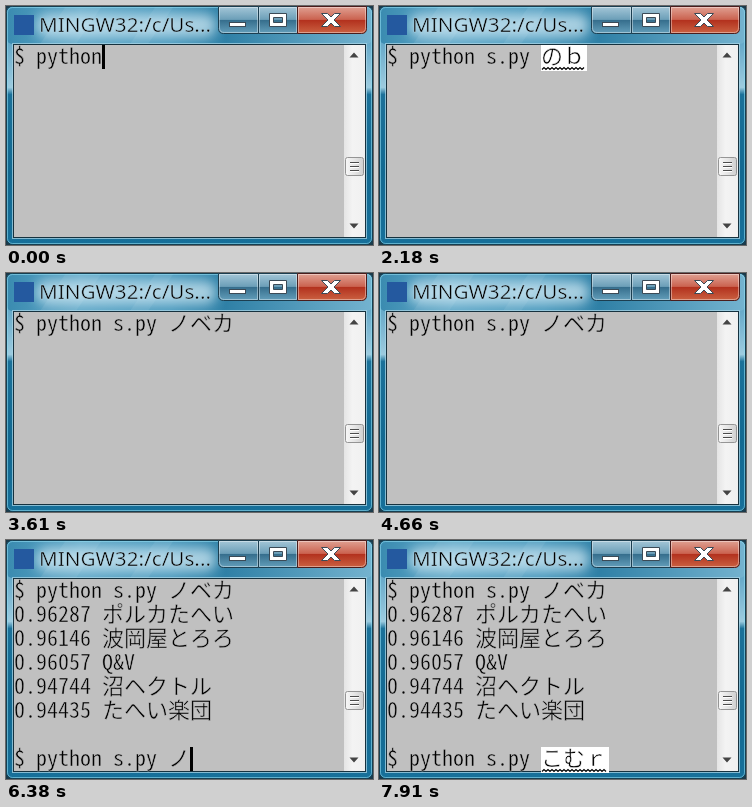
An HTML page that plays this animation: 367x239 px, repeating every 8000 ms.

```html
<!DOCTYPE html>
<html lang="ja">
<head>
<meta charset="utf-8">
<title>Terminal</title>
<style>
  html, body { margin: 0; width: 100%; height: 100%; overflow: hidden; background: #1b3a4a; }
  svg { display: block; width: 367px; height: 239px; }
  /* a stroke in the background colour thins the letters */
  text { white-space: pre; font-kerning: none; stroke-width: .5; }
  .title { font: 20.7px "Noto Sans", "Open Sans", sans-serif; stroke: #b4d6e5; }
  .term { font: 22px "Noto Sans Mono CJK JP", "Noto Sans CJK JP", "Noto Sans CJK SC", monospace; }
  .half { font-feature-settings: "hwid"; }
</style>
</head>
<body>
<svg viewBox="0 0 367 239">
  <defs>
    <linearGradient id="side" x2="0" y2="1">
      <stop offset="0" stop-color="#4f9cc0"/>
      <stop offset=".16" stop-color="#68aac9"/>
      <stop offset=".34" stop-color="#9ccbdf"/>
      <stop offset=".37" stop-color="#1b7199"/>
      <stop offset=".7" stop-color="#126991"/>
      <stop offset="1" stop-color="#17709a"/>
    </linearGradient>
    <linearGradient id="bar">
      <stop offset="0" stop-color="#3a8bb0"/>
      <stop offset=".2" stop-color="#61a8c8"/>
      <stop offset=".45" stop-color="#4b99bd"/>
      <stop offset=".6" stop-color="#2f80a6"/>
      <stop offset="1" stop-color="#74b3cf"/>
    </linearGradient>
    <linearGradient id="steel" x2="0" y2="1">
      <stop offset="0" stop-color="#a5c7d8"/>
      <stop offset=".48" stop-color="#6c9fb8"/>
      <stop offset=".5" stop-color="#356d8c"/>
      <stop offset="1" stop-color="#649fbb"/>
    </linearGradient>
    <linearGradient id="red" x2="0" y2="1">
      <stop offset="0" stop-color="#e0a294"/>
      <stop offset=".48" stop-color="#cb6350"/>
      <stop offset=".5" stop-color="#b2301d"/>
      <stop offset="1" stop-color="#cb6242"/>
    </linearGradient>
    <linearGradient id="track">
      <stop offset="0" stop-color="#e4e4e4"/>
      <stop offset=".4" stop-color="#f3f3f3"/>
      <stop offset="1" stop-color="#f0f0f0"/>
    </linearGradient>
    <linearGradient id="thumb">
      <stop offset="0" stop-color="#f7f7f7"/>
      <stop offset=".5" stop-color="#e6e6e6"/>
      <stop offset="1" stop-color="#cfcfcf"/>
    </linearGradient>
    <filter id="blur" x="-20%" y="-60%" width="140%" height="220%"><feGaussianBlur stdDeviation="6"/></filter>
    <clipPath id="top"><rect x="1" y="1" width="365" height="37"/></clipPath>
  </defs>

  <!-- glass frame -->
  <rect x=".5" y=".5" width="366" height="238" rx="6" fill="url(#side)" stroke="#153f52"/>
  <g clip-path="url(#top)">
    <rect x="1" y="1" width="365" height="37" rx="5" fill="url(#bar)"/>
    <path d="M60 0h36L70 38H34zM150 0h18l-26 38h-18z" fill="#fff" opacity=".07"/>
    <rect x="30" y="8" width="180" height="23" rx="10" fill="#dcf0f8" opacity=".68" filter="url(#blur)"/>
  </g>
  <rect x="1.500" y="1.500" width="364" height="236" rx="5" fill="none" stroke="#8fdcf2" stroke-opacity=".6"/>
  <rect x="8" y="9" width="20" height="20" fill="#24599f"/>
  <text class="title" x="33" y="25.500">MINGW32:/c/Us...</text>

  <!-- caption buttons -->
  <g stroke="#1c3e50">
    <path d="M212.500 .5h40v27h-35q-5 0-5-5z" fill="url(#steel)"/>
    <path d="M252.500 .5h39v27h-39z" fill="url(#steel)"/>
    <path d="M291.500 .5h69v22q0 5-5 5h-64z" fill="url(#red)" stroke="#4a1d1c"/>
  </g>
  <path d="M213.500 22V1.500h38v25h-33q-5 0-5-4.500M253.500 1.500h37v25h-37zM292.500 1.500h67V22q0 4.500-5 4.500h-62z" fill="none" stroke="#fff" stroke-opacity=".4"/>
  <g fill="#fff" stroke="#3b4a56">
    <rect x="223.500" y="16.500" width="16" height="4"/>
    <path fill-rule="evenodd" d="M263.500 7.500h17v13h-17zM267.500 11.500h9v5h-9z"/>
    <path d="M315.500 7.500h6L325 11l3.500-3.500h6l-6.500 6.500 6.500 6.500h-6L325 17l-3.500 3.500h-6L322 14z"/>
  </g>

  <!-- client area and scrollbar -->
  <rect x="6.500" y="37.500" width="354" height="195" fill="none" stroke="#a9d5e6" stroke-opacity=".75"/>
  <rect x="7.500" y="38.500" width="352" height="193" fill="#c0c0c0" stroke="#16323f"/>
  <rect x="338" y="39" width="21" height="192" fill="url(#track)"/>
  <path d="M343.500 51.500l4.500-5 4.500 5zM343.500 217.500l4.500 5 4.500-5z" fill="#444"/>
  <rect x="339.500" y="151.500" width="18" height="18" rx="2" fill="url(#thumb)" stroke="#959595"/>
  <path d="M344 157.500h9M344 161.500h9M344 165.500h9" stroke="#fff"/>
  <path d="M344 156.500h9M344 160.500h9M344 164.500h9" stroke="#4c4c4c"/>

  <g id="screen"></g>
</svg>

<script>
const LOOP = 8000, LEFT = 8, TOP = 39, CELL = 11, LINE = 24;
const GRAY = '#c0c0c0', WHITE = '#fff';
const NAME = 'ノベカ';
const CMD = '$ python s.py ';
const OUTPUT = [
  '0.96287 ポルカたへい',
  '0.96146 波岡屋とろろ',
  '0.96057 Q&V',
  '0.94744 沼ヘクトル',
  '0.94435 たへい楽団',
];

// [time, row, text on that row, caret shown, text being composed]
const steps = [
  [0, 0, '$ python', 1],
  [120, 0, '$ python ', 1],
  [710, 0, '$ python s', 1],
  [950, 0, CMD, 1],
  [1570, 0, CMD, 0],
  ...['ｎ', 'の', 'のｂ', 'のべ', 'のべｋ', 'のべか', NAME]
    .map((kana, i) => [1940 + Math.round(i * 71 / 6) * 10, 0, CMD, 0, kana]),
  [2890, 0, CMD + NAME, 1],
  [3140, 1, '', 1],
  [3610, 1, '', 0],
  [4170, 1, '', 1],
  [4660, 1, '', 0],
  [5220, 7, '', 1],
  [5340, 7, '$ ', 1],
  [5800, 7, '$ ', 0],
  [5920, 7, CMD + NAME, 1],
  [6260, 7, CMD + NAME.slice(0, 2), 1],
  [6380, 7, CMD + NAME[0], 1],
  [7000, 7, CMD, 1],
  [7460, 7, CMD, 0, 'こ'],
  [7670, 7, CMD, 0, 'こｍ'],
  [7910, 7, CMD, 0, 'こむｒ'],
];

const screen = document.getElementById('screen');

function add(parent, tag, attrs, content = '') {
  const el = document.createElementNS('http://www.w3.org/2000/svg', tag);
  for (const key in attrs) el.setAttribute(key, attrs[key]);
  el.textContent = content;
  return parent.appendChild(el);
}

const columns = s => [...s].reduce((n, c) => n + (c < '\x7f' ? 1 : 2), 0);
const rowY = row => TOP + row * LINE;

function write(row, x, s, back = GRAY) {
  const text = add(screen, 'text', { class: 'term', x, y: rowY(row) + 19, stroke: back });
  for (const run of s.match(/[ -~]+|[^ -~]+/g) || [])
    add(text, 'tspan', run[0] < '\x7f' ? { class: 'half' } : {}, run);
}

function compose(row, x, s) {
  const y = rowY(row), width = columns(s) * CELL;
  add(screen, 'rect', { x, y, width: width + 2, height: 26, fill: WHITE });
  write(row, x, s, WHITE);
  if (s === NAME) {
    add(screen, 'rect', { x: x + 1, y: y + 23, width: width - 1, height: 2 });
    return;
  }
  let wave = `M${x + 1} ${y + 24.5}`;
  for (let i = 2; i < width; i += 2) wave += `l2 ${i % 4 ? -2 : 2}`;
  add(screen, 'path', { d: wave, fill: 'none', stroke: '#000', 'stroke-width': 1.2 });
}

function draw([, row, line, caret, kana]) {
  screen.textContent = '';
  if (row > 0) write(0, LEFT, CMD + NAME);
  if (row > 1) OUTPUT.forEach((s, i) => write(i + 1, LEFT, s));
  write(row, LEFT, line);
  const x = LEFT + columns(line) * CELL;
  if (caret) add(screen, 'rect', { x, y: rowY(row), width: 3, height: LINE });
  if (kana) compose(row, x, kana);
}

let shown;
function tick() {
  const t = performance.now() % LOOP;
  const step = steps.findLast(s => s[0] <= t);
  if (step !== shown) draw(shown = step);
  requestAnimationFrame(tick);
}
tick();
</script>
</body>
</html>
```
